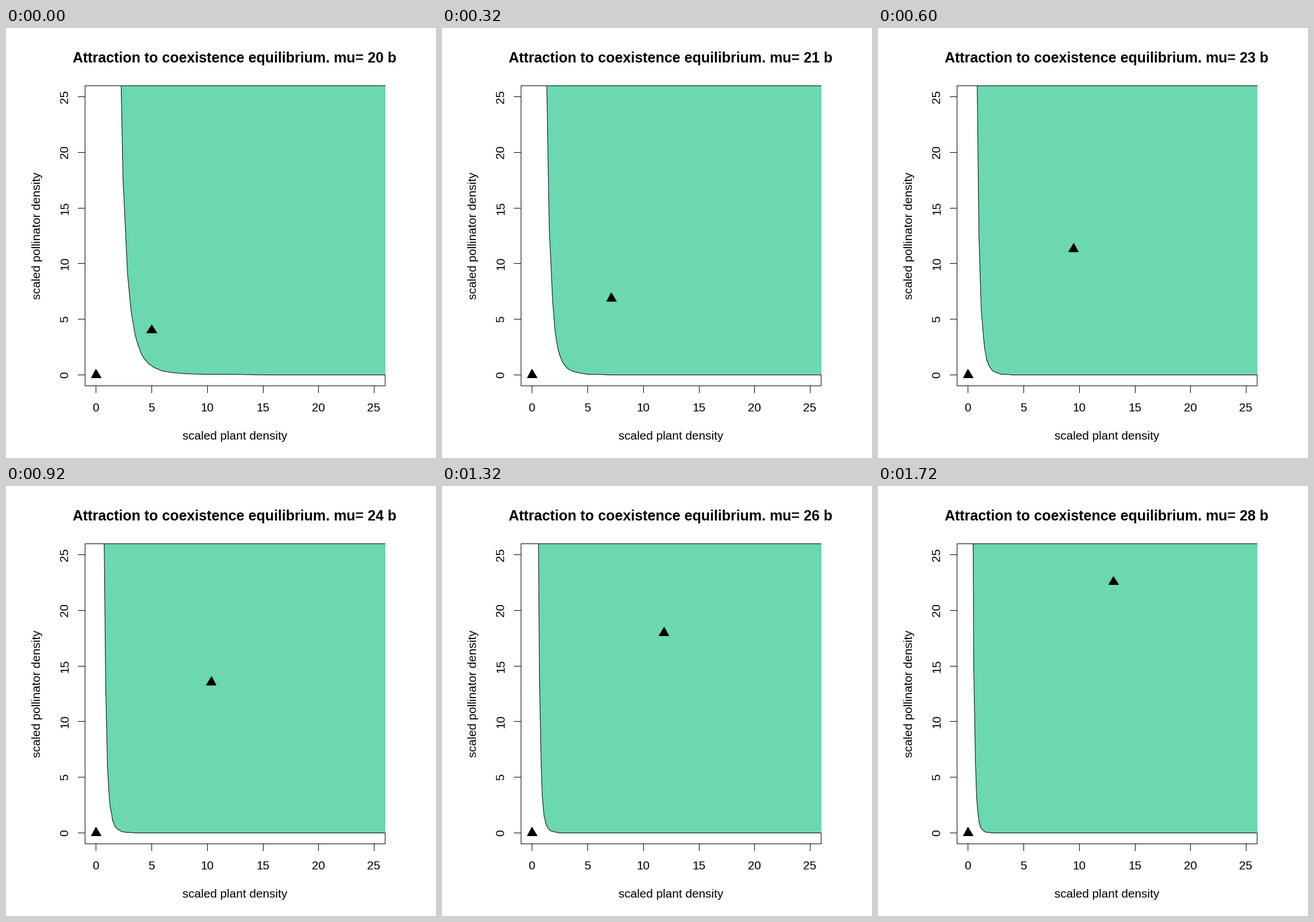
These frames come from a looping animation (748 px wide and 748 px high, 1.8 s). A matplotlib script:

```python
import numpy as np
import matplotlib.pyplot as plt
from matplotlib.animation import FuncAnimation
from matplotlib.patches import Polygon, Rectangle

SIZE, DPI = 748, 88
PT = 72 / DPI                      # points per pixel
SCALE, X0, Y0 = 19.35, 156.75, 603.35
LEFT, TOP, RIGHT, BOTTOM = 137, 100, 659, 622
GREEN = "#6bd8af"
LIMIT = 26

plt.rcParams["font.family"] = "Liberation Sans"


def to_px(points):
    points = np.asarray(points, float)
    return np.column_stack([X0 + SCALE * points[:, 0], Y0 - SCALE * points[:, 1]])


def pixel_centre(values):
    return np.floor(values) + 0.5


def flow(state, mu):
    plant, pollinator = state
    total = 1 + plant + pollinator
    return np.array([plant * (3.75 * pollinator / total - 1 - 0.1 * plant),
                     pollinator * (mu * plant / total - 10)])


def equilibria(mu):
    """Saddle and stable coexistence points."""
    m = mu / 10
    roots = np.sort(np.roots([m, 10 * m - 37.5 * (m - 1), 37.5]).real)
    return [np.array([x, (m - 1) * x - 1]) for x in roots]


def stable_direction(saddle, mu, h=1e-5):
    jacobian = np.column_stack([(flow(saddle + d, mu) - flow(saddle - d, mu)) / (2 * h)
                                for d in h * np.eye(2)])
    values, vectors = np.linalg.eig(jacobian)
    v = vectors[:, np.argmin(values.real)].real
    return v * np.sign(v[1])


def trace_back(state, mu, step=0.1, substeps=20):
    """Follow the flow backwards in time until it leaves the plot."""
    path, h = [state], -step / substeps
    while state.max() < LIMIT and len(path) < 100:
        for _ in range(substeps):
            k1 = flow(state, mu)
            k2 = flow(state + h / 2 * k1, mu)
            k3 = flow(state + h / 2 * k2, mu)
            k4 = flow(state + h * k3, mu)
            state = state + h / 6 * (k1 + 2 * k2 + 2 * k3 + k4)
        path.append(state)
    return path


def basin(saddle, mu):
    offset = 0.01 * stable_direction(saddle, mu)
    upper = trace_back(saddle + offset, mu)
    lower = trace_back(saddle - offset, mu)
    far = 2 * LIMIT
    corners = [(far, lower[-1][1]), (far, upper[-1][1] + far)]
    return pixel_centre(to_px(upper[::-1] + lower + corners))


def triangle(point):
    x, y = to_px([point])[0]
    return pixel_centre([(x, y - 9.9), (x + 8.6, y + 4.95), (x - 8.6, y + 4.95)])


fig = plt.figure(figsize=(SIZE / DPI, SIZE / DPI), dpi=DPI, facecolor="white")
ax = fig.add_axes([0, 0, 1, 1])
ax.set(xlim=(0, SIZE), ylim=(SIZE, 0))
ax.axis("off")


def line(xs, ys, z=1):
    ax.plot(pixel_centre(xs), pixel_centre(ys), color="black", lw=PT,
            snap=False, solid_capstyle="projecting", zorder=z)


def shape(color, z):
    return ax.add_patch(Polygon([(0, 0)] * 3, facecolor=color, edgecolor="black",
                                lw=PT, snap=False, zorder=z))


def label(x, y, text, size=20.8, **style):
    return ax.text(x, y, text, fontsize=size * PT, ha="center", va="baseline",
                   rotation_mode="anchor", **style)


line([LEFT, RIGHT, RIGHT, LEFT, LEFT], [TOP, TOP, BOTTOM, BOTTOM, TOP])
line([LEFT, RIGHT], [TOP, TOP], z=4)
for value in range(0, 26, 5):
    x, y = np.floor(to_px([(value, value)])[0])
    line([x, x], [BOTTOM, BOTTOM + 12])
    line([LEFT - 12, LEFT], [y, y])
    label(x, 667, str(value))
    label(108, y, str(value), rotation=90)
label(398, 716, "scaled plant density")
label(60, 361, "scaled pollinator density", rotation=90)
title = label(398, 60, "", size=25, weight="bold")

region = shape(GREEN, z=3)
region.set_clip_path(Rectangle((LEFT, TOP), RIGHT + 1 - LEFT, BOTTOM + 1 - TOP,
                               transform=ax.transData))
shape("black", z=5).set_xy(triangle((0, 0)))
marker = shape("black", z=5)


def update(frame):
    mu = 20 + frame
    saddle, stable = equilibria(mu)
    region.set_xy(basin(saddle, mu))
    marker.set_xy(triangle(stable))
    title.set_text(f"Attraction to coexistence equilibrium. mu= {mu} b")
    return region, marker, title


anim = FuncAnimation(fig, update, frames=9, interval=200, repeat=True, repeat_delay=0)
plt.show()
```
